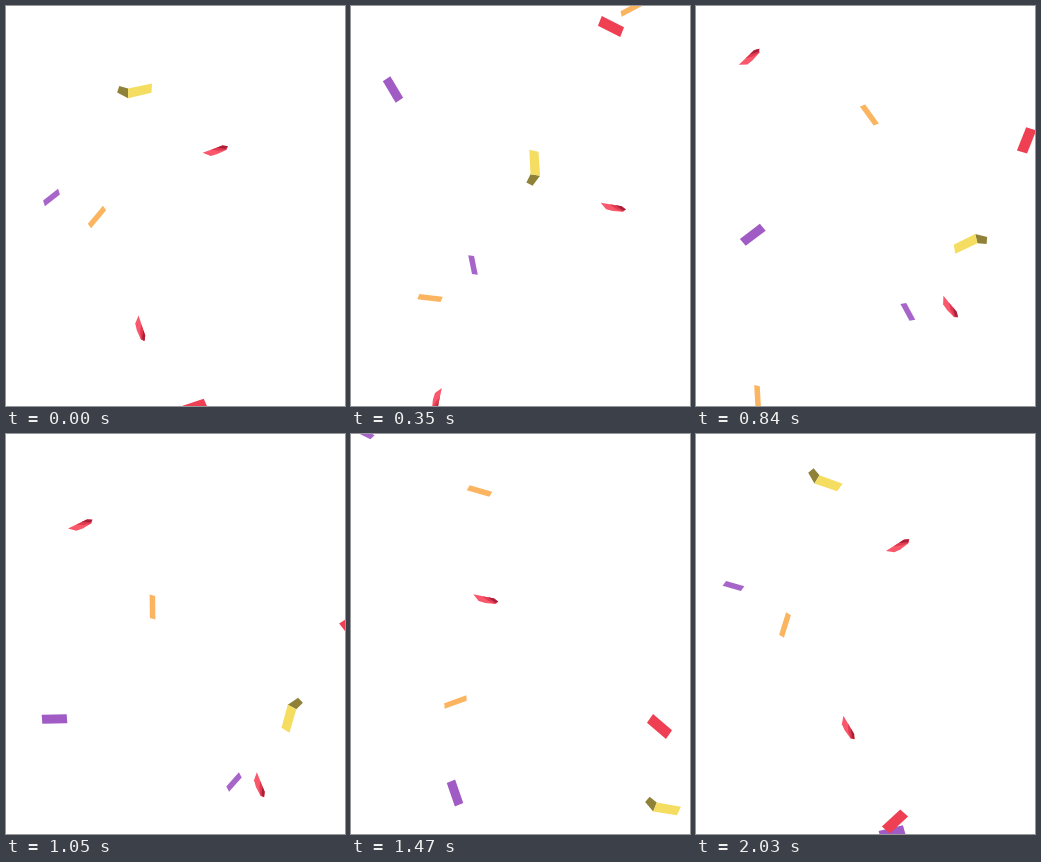
Recreate the animation shown at these times as an HTML page with a canvas. Size 339x400 px, loop 2.1 s.

```html
<!DOCTYPE html>
<html lang="en">
<head>
<meta charset="utf-8">
<title>Confetti</title>
<style>
  html, body { margin: 0; width: 100%; height: 100%; overflow: hidden; background: #fff; }
  canvas { display: block; }
</style>
</head>
<body>
<canvas id="stage" width="339" height="400"></canvas>
<script>
const ctx = document.getElementById('stage').getContext('2d');
const STEP = 70, FRAMES = 30;
// Pieces that outlive the loop skip one step at the seam.
const WRAP = (FRAMES + 1) * STEP;

function poly(color, ...pts) {
  ctx.fillStyle = color;
  ctx.beginPath();
  pts.forEach(([x, y]) => ctx.lineTo(x, y));
  ctx.closePath();
  ctx.fill();
}

// Slanted paper strip centred on its own origin
const strip = (color, len, wide, slant) => () => {
  const x = len / 2, y = wide / 2, s = slant / 2;
  poly(color, [-x + s, -y], [x + s, -y], [x - s, y], [-x - s, y]);
};

// Curled petal with a shaded tip
function petal() {
  poly('#f9576b', [-13, -1], [8, -3], [13, -1], [11, 2], [1, 4], [-6, 4]);
  poly('#e03a50', [-4, -1.8], [8, -3], [13, -1], [10, 2], [3, 1]);
  poly('#a8203a', [2, -2.4], [8, -3], [13, -1], [10.5, 0.8]);
}

// Folded strip, origin at the crease
function folded() {
  poly('#8f8238', [0, -4.5], [-8, -9], [-11.5, -3], [-2, 5]);
  poly('#f4dd60', [0, -4.5], [24.5, -4.5], [22, 4.5], [-2, 5]);
}

const purple = strip('#a05cc4', 25, 9, -0.5);
const violet = strip('#a765c9', 19, 5.5, 2);
const red = strip('#ef3f52', 25, 10.5, -1);
const orange = strip('#fbb560', 23.5, 5.5, 1.5);

// path: [time, x, y]; angle in degrees at time `from`, spin in degrees per step
const pieces = [
  { draw: purple, from: 350, angle: 59, spin: 12, path: [
    [0, -20, -20], [350, 42, 83.5], [630, 68.5, 166.5], [1050, 48.5, 285],
    [1470, 104, 359], [1750, 168.5, 378], [2030, 196, 398.5]] },
  { draw: violet, from: 1470, angle: 26, spin: 21.3, path: [
    [1190, -40, -60], [1470, 13, -1], [1750, 61, 76], [2030, 37.5, 152]] },
  { draw: violet, from: 0, angle: -38, spin: 23.3, path: [
    [0, 45.5, 191.5], [350, 122, 259], [630, 186.5, 271.5], [1050, 228, 348],
    [1470, 240, 440]] },
  { draw: orange, from: 1470, angle: 16, spin: 11.4, path: [
    [1050, 240, -20], [1470, 128.5, 57], [1750, 83.5, 113.5], [2030, 89, 191],
    [2170, 91, 211], [2520, 79, 292], [2800, 62, 353], [3220, 64, 428]] },
  { draw: orange, from: 350, angle: -28, spin: 11.75, path: [
    [0, 335, -50], [350, 280.5, 2.5], [630, 207.5, 47], [1050, 146.5, 173],
    [1470, 104.5, 268], [1750, 41.5, 312.5], [2030, -25, 345]] },
  { draw: petal, from: 1750, angle: -50, spin: 5.9, path: [
    [1470, 228, -30], [1750, 214, 41], [2030, 202, 112], [2170, 209.5, 144.5],
    [2520, 262, 201], [2800, 252, 252], [3220, 253.5, 351], [3640, 225, 440]] },
  { draw: petal, from: 630, angle: -56, spin: 6.05, path: [
    [350, 40, -60], [630, 39.5, 9], [1050, 74.5, 91], [1470, 134.5, 165],
    [1750, 161, 227.5], [2030, 152, 294], [2170, 134.5, 322.5],
    [2520, 86, 394], [2800, 60, 440]] },
  { draw: red, from: 350, angle: 27, spin: 12.1, path: [
    [0, 205, -60], [350, 260, 20.5], [630, 302, 83], [1050, 347, 187],
    [1470, 308.5, 292.5], [1750, 247.5, 348], [2030, 199, 387.5], [2170, 188, 401.5]] },
  { draw: folded, from: 2030, angle: 20, spin: -16.1, path: [
    [1750, 168, -24], [2030, 122, 45.5], [2170, 123, 87], [2520, 184, 168],
    [2800, 263, 198.5], [3220, 286, 274], [3640, 305, 373], [3920, 300, 440]] }
];

// Smooth curve through unevenly spaced keys
function spline(path, t, axis) {
  const last = path.length - 1;
  const i = Math.max(0, path.findIndex(k => k[0] >= t) - 1);
  const slope = n => {
    const a = path[Math.max(0, n - 1)], b = path[Math.min(last, n + 1)];
    return (b[axis] - a[axis]) / (b[0] - a[0]);
  };
  const p = path[i], q = path[i + 1], span = q[0] - p[0];
  const u = (t - p[0]) / span, v = 1 - u;
  return p[axis] * v * v * (1 + 2 * u) + slope(i) * span * u * v * v
       + q[axis] * u * u * (1 + 2 * v) - slope(i + 1) * span * u * u * v;
}

function place({ draw, from, angle, spin, path }, t) {
  if (t < path[0][0] || t > path[path.length - 1][0]) return;
  ctx.save();
  ctx.translate(spline(path, t, 1), spline(path, t, 2));
  ctx.rotate((angle + spin * (t - from) / STEP) * Math.PI / 180);
  draw();
  ctx.restore();
}

function render() {
  const t = Math.floor(performance.now() / STEP) % FRAMES * STEP;
  ctx.fillStyle = '#fff';
  ctx.fillRect(0, 0, 339, 400);
  for (const piece of pieces) {
    place(piece, t);
    place(piece, t + WRAP);
  }
  requestAnimationFrame(render);
}
render();
</script>
</body>
</html>
```
